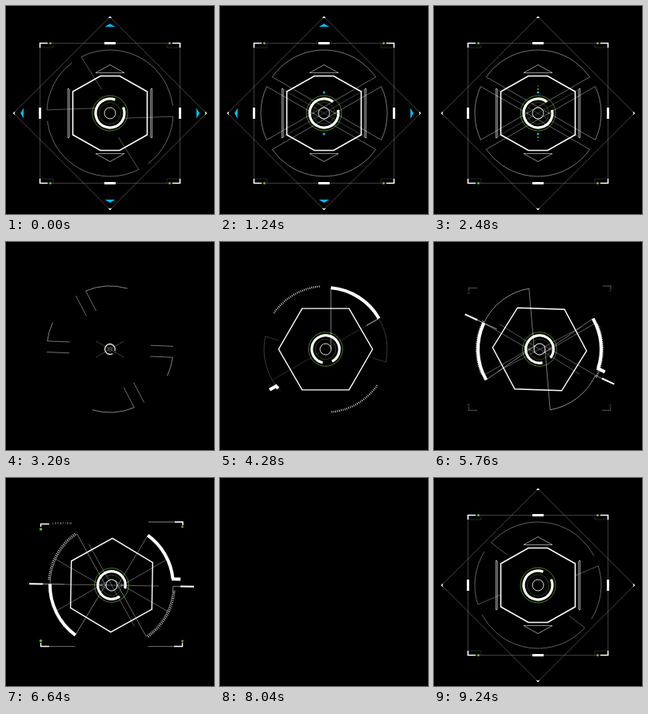
Write an HTML page with a canvas that moves like this. It is 260 px wide and 260 px high and loops after 9280 ms.

```html
<!DOCTYPE html>
<html lang="en">
<head>
<meta charset="utf-8">
<title>HUD loop</title>
<style>
html, body { margin: 0; width: 100%; height: 100%; overflow: hidden; background: #000; }
canvas { display: block; width: 260px; height: 260px; }
</style>
</head>
<body>
<canvas id="stage"></canvas>
<script>
const LOOP = 9280, STEP = 40;
const GREEN = '#69b52c', BLUE = '#00b9f2', WHITE = '#fff';
const canvas = document.getElementById('stage');
const ctx = canvas.getContext('2d');
const density = window.devicePixelRatio || 1;
canvas.width = canvas.height = 260 * density;

const rad = deg => deg * Math.PI / 180;
const polar = (r, deg) => [r * Math.cos(rad(deg)), r * Math.sin(rad(deg))];
const clamp = x => Math.max(0, Math.min(1, x));
const ramp = (t, a, b) => clamp((t - a) / (b - a));
const smooth = p => p * p * (3 - 2 * p);
const easeOut = p => 1 - (1 - p) ** 3;
const backIn = p => p * p * (2.3 * p - 1.3);
// Degrees left to turn for a spin that slows to rest at the given time.
const spinLeft = (t, end, amount) => amount * Math.max(0, (end - t) / 920) ** 3;

function stroke(width, color, alpha = 1) {
  ctx.globalAlpha = alpha;
  ctx.lineWidth = width;
  ctx.strokeStyle = color;
  ctx.stroke();
  ctx.globalAlpha = 1;
}
function line(points, width = 0.6, alpha = 1, closed = false) {
  ctx.beginPath();
  points.forEach(p => ctx.lineTo(...p));
  if (closed) ctx.closePath();
  stroke(width, WHITE, alpha);
}
function arc(r, from, to, width = 0.6, alpha = 1, color = WHITE) {
  if (to <= from) return;
  ctx.beginPath();
  ctx.arc(0, 0, r, rad(from), rad(to));
  stroke(width, color, alpha);
}
function dot(x, y, r, color) {
  ctx.fillStyle = color;
  ctx.beginPath();
  ctx.arc(x, y, r, 0, 7);
  ctx.fill();
}
function group(draw, { x = 0, y = 0, turn = 0, scale = 1, alpha = 1 } = {}) {
  if (scale <= 0.005 || alpha <= 0) return;
  ctx.save();
  ctx.translate(x, y);
  ctx.rotate(rad(turn));
  ctx.scale(scale, scale);
  draw();
  ctx.restore();
}
const twice = draw => [0, 180].forEach(turn => group(draw, { turn }));

// Straight side of a sector; side is -1 for its start, 1 for its end.
function edge(r, angle, side, length, alpha) {
  if (length <= 0) return;
  const [x, y] = polar(r, angle);
  const [dx, dy] = polar(length, angle + 180 + 5 * side);
  line([[x, y], [x + dx, y + dy]], 0.6, alpha);
}
function crossLines(r, alpha) {
  [30, 150].forEach(a => line([polar(r, a), polar(r, a + 180)], 0.6, alpha));
}
function rings(radius, gapFrom, gapTo) {
  arc(7, 0, 360, 1, 0.85);
  arc(radius - 4.5, 0, 360, 0.6, 0.6, GREEN);
  arc(radius, gapTo, gapFrom + 360, 3.2);
  arc(radius + 4, 0, 360, 0.8, 0.85, GREEN);
}

function squareFrame() {
  ctx.beginPath();
  ctx.rect(-87.5, -87.5, 175, 175);
  stroke(0.6, WHITE, 0.4);
  for (const sx of [-1, 1]) for (const sy of [-1, 1]) {
    const at = (x, y) => [sx * x, sy * y];
    line([at(71, 87.5), at(71, 82), at(87.5, 82)], 0.5, 0.3);
    line([at(78, 87.5), at(87.5, 87.5), at(87.5, 82)], 1.6);
    dot(...at(74.5, 87.5), 1.5, GREEN);
  }
  for (let i = 0; i < 4; i++)
    group(() => line([[-7, -87.5], [7, -87.5]], 3), { turn: i * 90 });
}
function diamond() {
  line([[0, -120.5], [120.5, 0], [0, 120.5], [-120.5, 0]], 0.6, 0.45, true);
  for (let i = 0; i < 4; i++)
    group(() => line([[-1.5, -119], [0, -120.5], [1.5, -119]], 1.2), { turn: i * 90 });
}
function triangles() {
  ctx.fillStyle = BLUE;
  for (let i = 0; i < 4; i++) group(() => {
    ctx.beginPath();
    ctx.moveTo(0, -112);
    ctx.lineTo(6.5, -108);
    ctx.lineTo(-6.5, -108);
    ctx.fill();
  }, { turn: i * 90 });
}
function cutHexagon() {
  line([[-12, -46.5], [12, -46.5], [46.5, -27], [46.5, 27], [12, 46.5],
        [-12, 46.5], [-46.5, 27], [-46.5, -27]], 1.6, 1, true);
  twice(() => {
    line([[-18, -50.5], [0, -60.5], [18, -50.5]], 0.7, 0.8, true);
    line([[-52.5, -31], [-50.7, -30], [-50.7, 30], [-52.5, 31]], 0.8, 0.8, true);
  });
}

function diamondScene(t) {
  const leave = ramp(t, 2480, 2880);
  const fold = ramp(t, 2900, 3400);
  const close = 1 - smooth(fold);
  const shrink = 1 - backIn(leave);
  const enter = (a, b) => ({ scale: easeOut(ramp(t, a, b)) * shrink, alpha: ramp(t, a, b) });

  group(squareFrame, enter(-720, -240));
  group(diamond, enter(-600, -120));
  group(cutHexagon, enter(-800, -360));
  if (t >= 0 && t < 2080) triangles();

  const settle = ramp(t, 0, 920);
  group(() => rings(18, -69 + 17 * settle, -24 + 11 * settle),
    { scale: easeOut(ramp(t, -880, -560)) * close, turn: 120 * fold });

  const turn = 90 * fold * fold - spinLeft(t, 920, 152);
  const span = ramp(t, -480, -40) * close;
  const firstEdge = Math.max(0, Math.min(80, 48 + 0.575 * t)) * close;
  const lastEdge = 80 * easeOut(ramp(t, 80, 800)) * close;
  const alpha = 0.5 * ramp(t, -560, -40) + 0.15 * settle;
  group(() => twice(() => {
    for (const [from, to, stretch] of [[215, 325, 1], [155, 205, 1.27]]) {
      arc(79, from, from + (to - from) * span, 0.7, alpha);
      edge(79, from, -1, Math.min(80 * close, firstEdge * stretch), alpha);
      edge(79, to, 1, lastEdge, alpha);
    }
  }), { turn });
  crossLines(58 * easeOut(ramp(t, 400, 920)) * close, 0.4);

  if (t < 2880) twice(() => {
    [[26, 1.5, BLUE], [30, 1, GREEN], [34, 0.7, GREEN]].forEach(([y, r, color], i) =>
      dot(0, -y, r * ramp(t, 1000 + i * 240, 1240 + i * 240), color));
  });
}

function brackets(t) {
  const alpha = ramp(t, 5680, 6000) * (1 - ramp(t, 7000, 7440));
  const reach = 43 * easeOut(ramp(t, 5760, 6400));
  if (!alpha) return;
  ctx.globalAlpha = alpha;
  dot(-88.5, -70, 1.8, GREEN);
  dot(-88.5, 69.5, 1.8, GREEN);
  dot(88.5, -73, 1.4, GREEN);
  dot(88.5, 70, 1.4, GREEN);
  line([[-88.5, -73], [-88.5, -76.5], [-78, -76.5]], 1.5, alpha);
  line([[89, -75], [89, -79], [79, -79]], 1.5, alpha);
  line([[89, -79], [89 - reach, -79]], 0.8, 0.65 * alpha);
  for (const s of [-1, 1]) {
    line([[s * 88.5, 72], [s * 88.5, 76.5], [s * 78, 76.5]], 1.4, alpha);
    line([[s * 88.5, 76.5], [s * (88.5 - reach), 76.5]], 0.7, 0.6 * alpha);
  }
  ctx.globalAlpha = 0.8 * alpha;
  ctx.fillStyle = WHITE;
  ctx.font = '3px Roboto, sans-serif';
  ctx.letterSpacing = '1.35px';
  ctx.fillText('LOCATION'.slice(0, Math.ceil(8 * ramp(t, 5800, 6440))), -74, -75.6);
  ctx.globalAlpha = 1;
}

function hexagonScene(t) {
  const quarter = -89 * easeOut(ramp(t, 5280, 6640));
  const swing = smooth(ramp(t, 5600, 6640));
  const exit = smooth(ramp(t, 6720, 7480));
  const close = 1 - smooth(ramp(t, 7520, 8040));
  const enter = easeOut(ramp(t, 3720, 4160));
  const heavyTurn = quarter - spinLeft(t, 5200, 300);
  const thinTurn = quarter - spinLeft(t, 5200, 313);
  const thinAlpha = (0.3 + 0.4 * ramp(t, 4280, 4800)) * ramp(t, 3900, 4160);

  group(() => {
    line([0, 60, 120, 180, 240, 300].map(a => polar(58.7, a)), 1.4, 1, true);
  }, { scale: enter * close, turn: 31 * swing });
  group(() => crossLines(59 * easeOut(ramp(t, 4480, 5040)) * close, 0.55), { turn: 31 * swing });

  const gap = 82 - 14 * ramp(t, 4280, 5200) - 34 * smooth(ramp(t, 5300, 6600));
  group(() => rings(17.3, gap - 20, gap + 20), { scale: enter * close });

  // Thin halves of the large sectors trail the heavy ones.
  group(() => twice(() => {
    const end = 270 + 55 * ramp(t, 3800, 4240) * (1 - exit);
    arc(77, 270, end, 0.7, thinAlpha);
    edge(77, 325, 1, 80 * ramp(t, 4160, 4720) * (1 - exit), thinAlpha);
  }), { turn: thinTurn });

  group(() => {
    const lower = ramp(t, 4250, 4800);
    arc(77, 215 + 55 * exit, 215 + 55 * ramp(t, 3760, 4240), 4);
    arc(77, 83 - 48 * lower * (1 - exit), 83, 4);
    edge(77, 215, -1, 76 * ramp(t, 3800, 4240) * (1 - exit), 0.75);
    edge(77, 35, -1, 76 * ramp(t, 4400, 4960) * (1 - exit), 0.65);
    const hook = ramp(t, 4080, 4280) * (1 - exit);
    if (hook) line([[9, 75], [9, 75 + 11 * hook]], 4);
    const stem = ramp(t, 4000, 4240) * (1 - exit);
    line([[0, -59], [0, -59 - 18 * stem - 9 * ramp(t, 4280, 4480) * stem]], 0.8, 0.75 * stem);
    const spoke = 0.25 * stem * (1 - ramp(t, 4400, 4800));
    twice(() => line([[0, -8], [0, -76]], 0.6, spoke));
    const tick = ramp(t, 4300, 4560) * (1 - exit);
    if (tick) {
      line([[0, 77], [0, 86]], 0.7, 0.7 * tick);
      twice(() => line([[0, -86], [0, -86 - 17 * tick]], 2));
    }
  }, { turn: heavyTurn });

  const dotted = ramp(t, 3800, 4240) * (1 - smooth(ramp(t, 7200, 7800)));
  group(() => twice(() => {
    ctx.setLineDash([0.9, 1.5]);
    arc(78.8, 205 - 50 * dotted, 205, 2.4, 0.85);
    ctx.setLineDash([]);
  }), { turn: 30 * swing - spinLeft(t, 5200, 300) });

  const side = easeOut(ramp(t, 4500, 5080));
  twice(() => {
    const span = 25 * side * (1 - ramp(t, 5300, 5800));
    arc(77, 180 - span, 180 + span, 0.7, 0.65);
    edge(77, 155, -1, 80 * side * close, 0.6);
    edge(77, 205, 1, 80 * side * close, 0.6);
  });

  if (t < 5800) twice(() => {
    [[27, 2.3, BLUE], [35, 1.6, GREEN], [41, 1.2, GREEN], [46, 0.8, GREEN]].forEach(([x, r, color], i) =>
      dot(x, 0, r * ramp(t, 4720 + i * 80, 4880 + i * 80) * (1 - ramp(t, 5440, 5760)), color));
  });
  brackets(t);
}

function render() {
  const t = Math.floor(performance.now() % LOOP / STEP) * STEP;
  ctx.setTransform(density, 0, 0, density, 0, 0);
  ctx.fillStyle = '#000';
  ctx.fillRect(0, 0, 260, 260);
  if (t < 3400 || t >= 8400) {
    const sceneTime = t >= 8400 ? t - LOOP : t;
    group(() => diamondScene(sceneTime), { x: 130, y: 134 });
  } else if (t >= 3720 && t < 8040) {
    group(() => hexagonScene(t), { x: 132, y: 134 });
  }
  requestAnimationFrame(render);
}
render();
</script>
</body>
</html>
```
